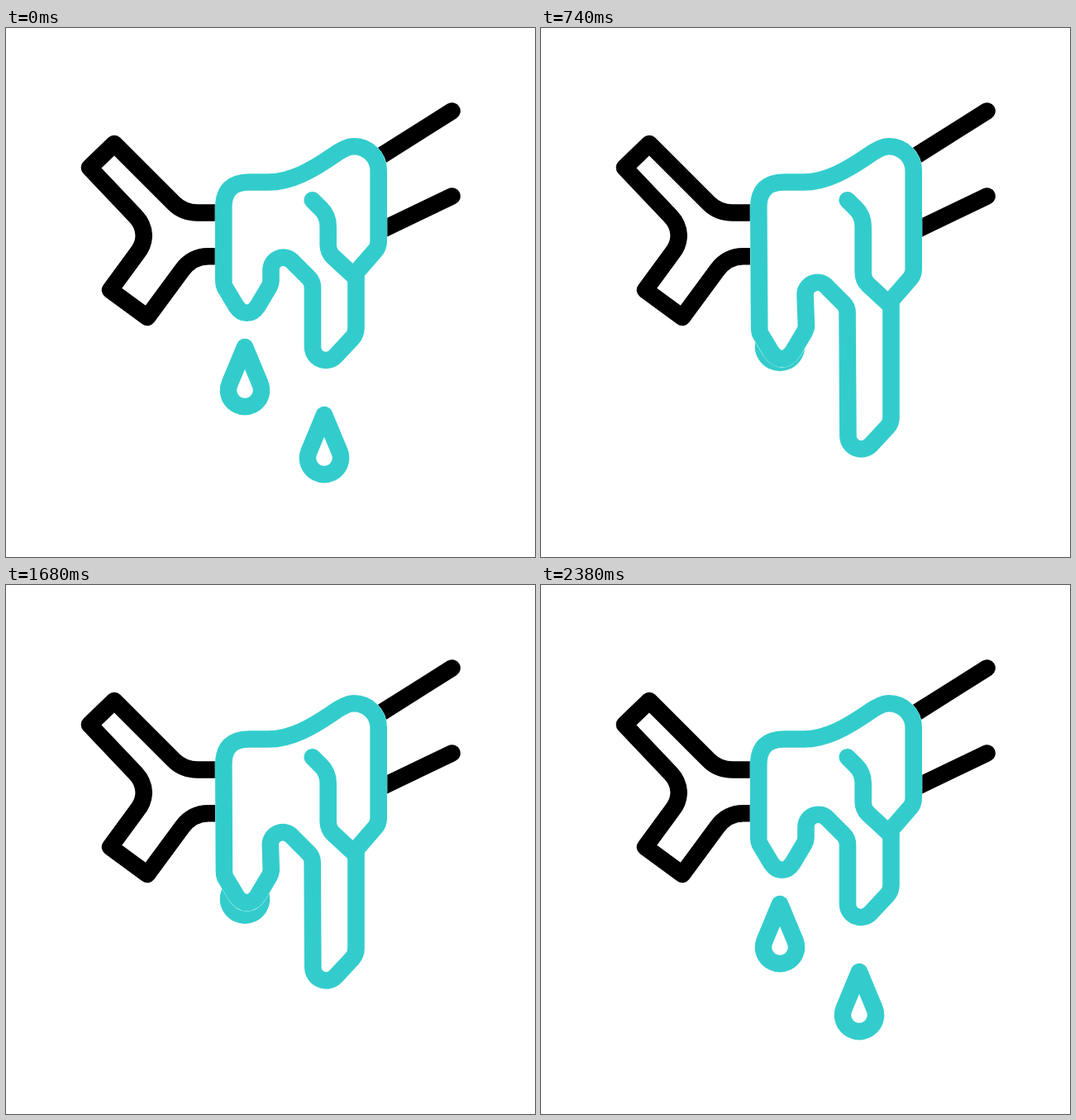
These frames come from a looping animation (640x640 px, 2400 ms). An HTML page:

```html
<!DOCTYPE html>
<html lang="en">
<head>
<meta charset="utf-8">
<title>Dripping slime</title>
<style>
  html, body { margin: 0; height: 100%; overflow: hidden; background: #fff; }
  svg { display: block; width: 100%; height: 100%; }
  path { fill: none; stroke: #33cccc; stroke-width: 20.6; stroke-linecap: round; stroke-linejoin: round; }
  .bone { stroke: #000; }
  #backing { fill: #fff; stroke: #fff; stroke-width: 21.2; }
</style>
</head>
<body>
<svg viewBox="0 0 640 640">
  <path class="bone" d="M263 223.5H232Q214.5 223.5 203 212L131 140 101 169 157 228C169 241 170 258 159 272L126 317 171 350 213 293Q225 276.2 245 276.2H263"/>
  <path class="bone" d="M539.5 100.5L450 157M539.5 203.5L450 246.5"/>
  <path id="left" d="M289 386L270.5 430.5A20 20 0 1 0 307.5 430.5Z"/>
  <path id="right" d="M385 468L366.5 512.5A20 20 0 1 0 403.5 512.5Z"/>
  <path id="backing"/>
  <path id="slime"/>
  <path id="fold"/>
</svg>
<script>
const LOOP = 2400, HALF = LOOP / 2;
const $ = id => document.getElementById(id);
const clamp = x => Math.min(1, Math.max(0, x));
const smooth = x => x * x * (3 - 2 * x);

// cubic-bezier(a, 0, b, 1)
function ease(x, a, b) {
  let lo = 0, hi = 1;
  for (let i = 0; i < 24; i++) {
    const s = (lo + hi) / 2, r = 1 - s;
    if (3 * r * r * s * a + 3 * r * s * s * b + s ** 3 < x) lo = s; else hi = s;
  }
  return smooth(lo);
}

// Moves of each drop: start, end, y from, y to, x from, x to
const drops = {
  left: [
    [0, 610, 0, 266, 0, 0],
    [610, 1250, -92, 266, 0, 0],
    [1440, 2030, -92, 0, 0, 0]
  ],
  right: [
    [0, 610, 0, 184, 0, 0],
    [645, 1663, -90, 184, 14, 14],
    [1779, 2155, -85, 0, 4, 0]
  ]
};

function placeDrop(id, t) {
  const move = drops[id].filter(m => t >= m[0]).pop();
  const [start, end, y0, y1, x0, x1] = move;
  const k = smooth(clamp((t - start) / (end - start)));
  $(id).setAttribute("transform", `translate(${x0 + (x1 - x0) * k} ${y0 + (y1 - y0) * k})`);
}

function drawSlime(p) {
  const arch = 35.6 * p, fold = 38.5 * p, short = 63 * p, long = 123 * p;
  const outline = `M${263.3 + p} ${307 + short}L263.3 217Q263.3 186.5 294 186.5H318
    C345 186.5 370 172 395 155Q411 143.2 421 143.2A29.5 29.5 0 0 1 450.7 172.7
    V${258 + fold}Q450.7 265 446 270`.replace("Q450.7 265 446 270",
      `Q450.7 ${265 + fold} 446.5 ${269.5 + fold}`) +
    `L423.5 ${296 + fold}V${363 + long}Q423.5 ${370 + long} 419 ${375 + long}
    L398.5 ${397 + long}A16 16 0 0 1 ${371 + p / 2} ${386 + long}
    L${371 - p / 2} ${314 + arch}Q371 ${307 + arch} 366 ${302 + arch}
    L346.5 ${282.5 + arch}A15 15 0 0 0 ${320.5 - p} ${293 + arch}
    L${320.5 + p / 2} ${306 + short}Q320.5 ${309 + short} 318.5 ${313 + short}
    L304.5 ${336.5 + short}Q299 ${344.8 + short} 291.5 ${344.8 + short}
    T278.5 ${336.5 + short}L265 ${314 + short}Q${263.3 + p} ${311 + short} ${263.3 + p} ${307 + short}Z`;
  $("backing").setAttribute("d", outline);
  $("slime").setAttribute("d", outline);
  $("fold").setAttribute("d", `M370.7 208.3L381 218.5Q389.7 227 389.7 240V${262 + fold}
    Q389.7 ${271 + fold} 396 ${277 + fold}L423 ${302 + fold}`);
}

function frame() {
  const t = performance.now() % LOOP;
  drawSlime(t < HALF ? ease(t / HALF, .72, .15) : 1 - ease((t - HALF) / HALF, .69, .116));
  placeDrop("left", t);
  placeDrop("right", t);
  requestAnimationFrame(frame);
}
frame();
</script>
</body>
</html>
```
